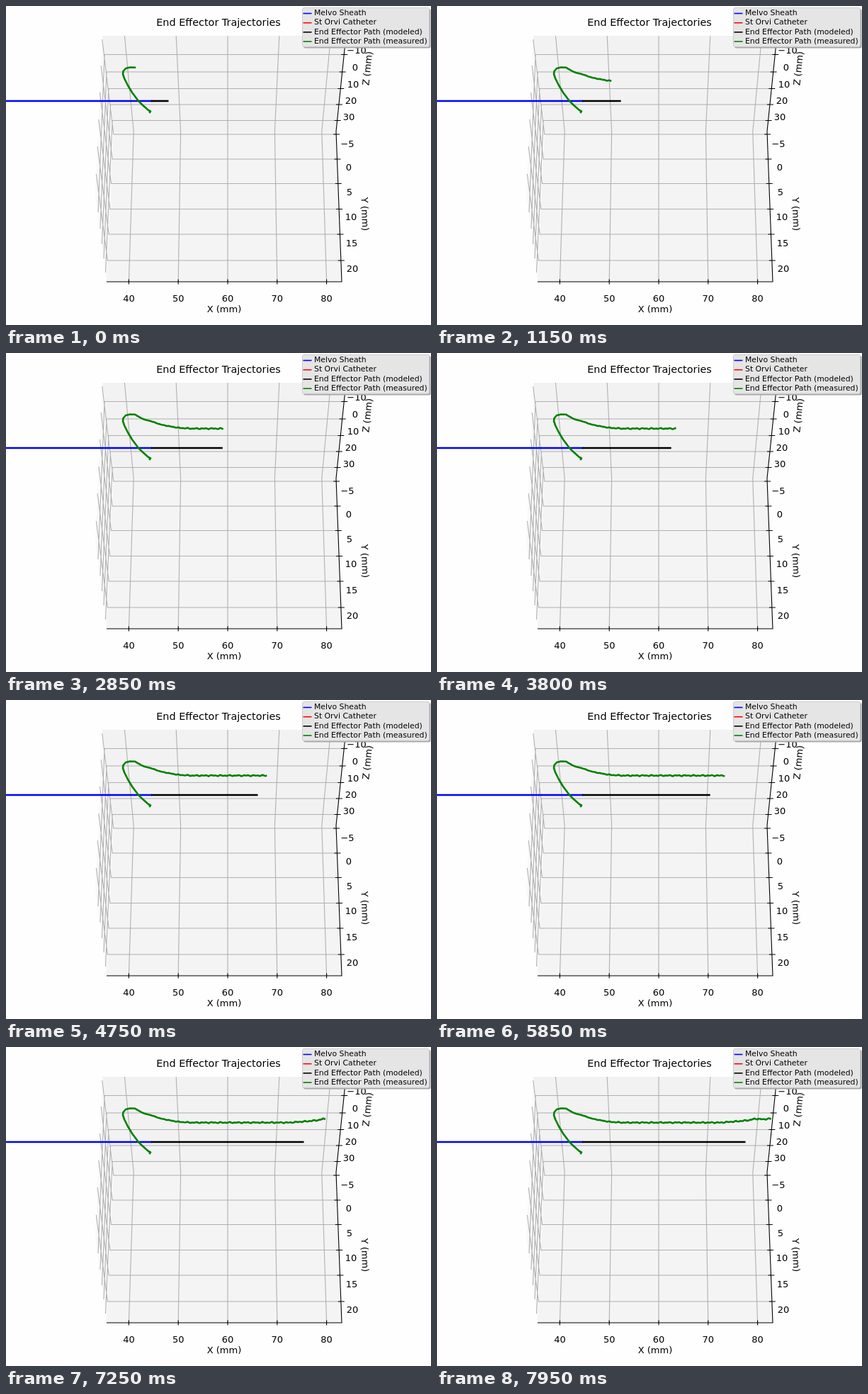
These frames come from a looping animation (600x450 px, 8 s). An HTML page:

```html
<!DOCTYPE html>
<html lang="en">
<head>
<meta charset="utf-8">
<title>End Effector Trajectories</title>
<style>
  html, body { margin: 0; width: 100%; height: 100%; overflow: hidden; background: #fefefe; }
  svg { display: block; }
  text { font: 13px "DejaVu Sans", sans-serif; text-anchor: middle; }
  .title { font-size: 14.4px; }
  .legend text { font-size: 10.85px; text-anchor: start; }
  .grid { stroke: #b0b0b0; stroke-width: 1.1; fill: none; }
  .axis { stroke: #000; stroke-width: 1.1; fill: none; }
  .path { fill: none; stroke-width: 2.6; stroke-linejoin: round; stroke-linecap: square; }
</style>
</head>
<body>
<svg id="stage" width="600" height="450" viewBox="0 0 600 450">
  <path fill="#f9f9f9" d="M136 42L152 177L142 389L126 268Z"/>
  <path fill="#f2f2f2" d="M136 42H480L466 177H152Z"/>
  <path fill="#f4f4f4" d="M152 177H466L474 389H142Z"/>
  <path id="grid" class="grid"/>
  <path id="axes" class="axis"/>
  <g id="labels"></g>
  <path class="path" stroke="#00f" d="M-5 134H205"/>
  <path id="modeled" class="path" stroke="#000" style="stroke-linecap:butt"/>
  <path id="measured" class="path" stroke="#008000"/>
  <g id="legend" class="legend">
    <rect x="420" y="4" width="179.5" height="55.5" rx="2.5" fill="#a8a8a8"/>
    <rect x="418.5" y="2.5" width="179" height="55" rx="2.5" fill="#e5e5e5" stroke="#ccc"/>
  </g>
</svg>
<script>
const $ = id => document.getElementById(id);
const LOOP = 8000;

function addText(parent, text, x, y, attrs = {}) {
  const node = document.createElementNS("http://www.w3.org/2000/svg", "text");
  node.textContent = text;
  Object.entries({ x, y, ...attrs }).forEach(([k, v]) => node.setAttribute(k, v));
  parent.append(node);
}

// Piecewise linear interpolation through [x, y] pairs
function lerpKeys(keys, x) {
  let i = 1;
  while (i < keys.length - 1 && keys[i][0] < x) i++;
  const [x0, y0] = keys[i - 1], [x1, y1] = keys[i];
  return y0 + (y1 - y0) * (x - x0) / (x1 - x0);
}

function buildAxes() {
  let grid = "", axes = "M142 389H474L466 177L480 42";
  const labels = $("labels");
  const label = (text, x, y) => addText(labels, text, x, y + 4.7);

  for (let i = -2; i <= 2; i++) {
    const x = 313 + i * 69.8;
    grid += `M${x} 389L${313 + i * 66.4} 177L${313 + i * 72.8} 42`;
    axes += `M${x} 385.5V392.5`;
    label(60 + i * 10, x, 412);
  }
  // Each row: value, height on the far wall, height at the near edge, label position
  [["−5", 181, 47, 482, 194], ["0", 216, 84, 484, 227], ["5", 250.5, 122, 485, 262],
   ["10", 286.5, 160, 487, 297], ["15", 322, 198, 488, 334], ["20", 359, 237, 489, 370]]
  .forEach(([text, y, nearY, lx, ly]) => {
    const left = 152 - (y - 177) * 10 / 212, right = 466 + (y - 177) * 8 / 212;
    grid += `M${right} ${y}H${left}L${136 - (nearY - 42) * 10 / 226} ${nearY}`;
    axes += `M${right - 4} ${y}h9`;
    label(text, lx, ly);
  });
  // Each row: value, height on the upper wall, lower end on the side wall, label position
  [["−10", 68.5, 130, 291, 495, 62], ["0", 93, 133, 314, 493, 86], ["10", 116.5, 135.5, 336, 490, 110],
   ["20", 139, 138, 356, 487, 133], ["30", 161.5, 140.5, 376, 484, 156]]
  .forEach(([text, y, x, bottom, lx, ly]) => {
    const left = 136 + (y - 42) * 16 / 135, right = 480 - (y - 42) * 14 / 135;
    grid += `M${right} ${y}H${left}L${x} ${bottom}`;
    axes += `M${right - 4} ${y}h9`;
    label(text, lx, ly);
  });
  $("grid").setAttribute("d", grid);
  $("axes").setAttribute("d", axes);

  label("X (mm)", 308, 427);
  label("Y (mm)", 0, 0);
  labels.lastChild.setAttribute("transform", "translate(507 293.5) rotate(88)");
  label("Z (mm)", 0, 0);
  labels.lastChild.setAttribute("transform", "translate(510 88) rotate(-84)");
  addText(labels, "End Effector Trajectories", 300, 28, { class: "title" });
}

function buildLegend() {
  [["#00f", "Melvo Sheath"], ["#f00", "St Orvi Catheter"],
   ["#000", "End Effector Path (modeled)"], ["#008000", "End Effector Path (measured)"]]
  .forEach(([color, text], i) => {
    const y = 10.5 + i * 13.2;
    $("legend").insertAdjacentHTML("beforeend",
      `<path d="M419.5 ${y}H431.5" stroke="${color}" stroke-width="1.6"/>`);
    addText($("legend"), text, 435, y + 2.7);
  });
}

const modeledEnd = [[0, 229.5], [100, 407], [119, 435.5]];
const measuredEnd = [[0, 182], [17, 245], [43, 305.5], [71, 367], [88, 405], [100, 431], [119, 470.5]];
const measuredY = [[182, 86.7], [191, 92], [196, 94], [203, 95.8], [210, 98], [217, 100.5], [226, 102.5],
  [234, 104], [245, 105.7], [262, 106.6], [400, 106.6], [425, 104.8], [441, 103.2], [449, 101.2],
  [460, 102], [472, 101]];
const hook = "M203 150L204 148.5L201 147L192 139L187 134L178 122L172 112L167 102L165 96L165.5 92L169 88L175 86.5L182 86.7";

function wiggle(x) {
  const strength = Math.min(1, Math.max(0, (x - 195) / 70));
  return strength * (0.55 * Math.sin(x * 0.95) + 0.4 * Math.sin(x * 0.53 + 1));
}

function draw(now) {
  // 15 steps per second, each snapped to a 50 ms clock
  const tick = Math.floor((now % LOOP) / 50);
  const step = Math.floor((tick + 0.5) * 0.75);

  $("modeled").setAttribute("d", `M205 134H${lerpKeys(modeledEnd, step)}`);

  const end = lerpKeys(measuredEnd, step);
  const point = x => `L${x} ${lerpKeys(measuredY, x) + wiggle(x)}`;
  let d = hook;
  for (let x = 184; x < end; x += 2) d += point(x);
  $("measured").setAttribute("d", d + point(end));
  requestAnimationFrame(draw);
}

buildAxes();
buildLegend();
const start = performance.now();
(function loop() {
  draw(0);
})();
</script>
</body>
</html>
```
